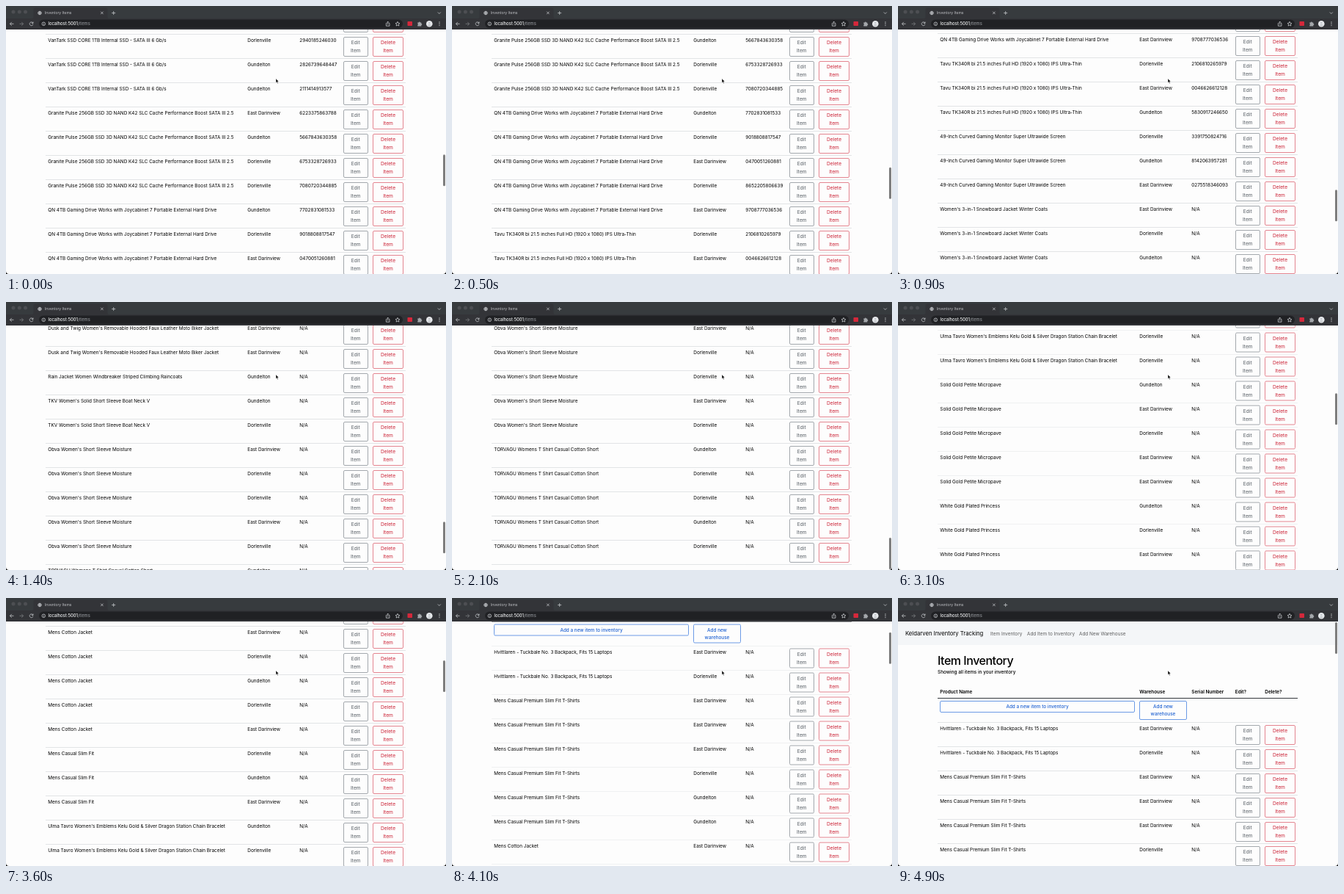
Animation, 600 px wide and 365 px high, one loop 5 s. Source, as an HTML page:

```html
<!DOCTYPE html>
<html lang="en">
<head>
<meta charset="utf-8">
<title>Inventory Items</title>
<style>
  * { box-sizing: border-box; }
  html, body { margin: 0; width: 100%; height: 100%; overflow: hidden; background: #000; }
  .stage { position: relative; width: 600px; height: 365px; overflow: hidden;
    border-radius: 0 0 4px 4px; background: #fdfdfd; color: #000;
    font: 6.4px/10px Inter, "Liberation Sans", sans-serif; }
  .chrome { position: absolute; left: 0; top: 0; width: 600px; height: 32px; }
  .view { position: absolute; left: 0; top: 32px; width: 600px; height: 333px; overflow: hidden; }
  .page { position: absolute; left: 0; top: 0; width: 600px; height: 2521px; }
  .page > * { position: absolute; white-space: nowrap; }
  nav { left: 0; top: 0; width: 600px; height: 32px; background: #f4f6f8; }
  nav span { position: absolute; top: 12px; color: rgba(0, 0, 0, .62); }
  nav .brand { left: 10px; color: #000; font-size: 7.7px; }
  h1 { left: 54px; top: 43px; margin: 0; font-size: 16px; line-height: 20px; font-weight: 500; letter-spacing: -.03em; }
  .lead { left: 54px; top: 64px; font-weight: 500; }
  .table { left: 54px; top: 87px; width: 491px; }
  .row { display: grid; grid-template-columns: 272px 71px 59.5px 40.5px 48px;
    height: 33px; box-shadow: 0 1px #e2e4e6; }
  .row > div { padding: 4.2px 3.3px 0; }
  .head { height: 17px; font-weight: 600; box-shadow: 0 1px #34383c; }
  .btn { margin-top: -.6px; border: 1px solid; border-radius: 2px; text-align: center; white-space: pre; }
  .add { padding: 2.3px 0; color: #1f62d2; border-color: #6c9be6; font-weight: 500; }
  .edit, .del { height: 27px; padding-top: 2.3px; font-size: 6.6px; line-height: 11px; }
  .edit { color: #555c63; border-color: #a3a8ad; }
  .del { color: #cb1f33; border-color: #e48590; }
  .thumb { position: absolute; left: 596px; top: 1px; width: 3px; height: 43px; border-radius: 2px; background: #7d7d7d; }
  .cursor { position: absolute; left: 367px; top: 98px; }
</style>
</head>
<body>
<div class="stage">
  <div class="view">
    <div class="page" id="page">
      <nav>
        <span class="brand">Keldarven Inventory Tracking</span>
        <span style="left:126px">Item Inventory</span>
        <span style="left:176px">Add Item to Inventory</span>
        <span style="left:247px">Add New Warehouse</span>
      </nav>
      <h1>Item Inventory</h1>
      <div class="lead">Showing all items in your inventory</div>
      <div class="table" id="table"></div>
    </div>
    <div class="thumb" id="thumb"></div>
  </div>

  <svg class="chrome" viewBox="0 0 600 32" font-family="Inter, 'Liberation Sans', sans-serif">
    <rect width="600" height="32" fill="#373b3e"/>
    <path d="M0 17H600V32H0Z M35 17q2.500 0 2.500-2.500V5q0-2.500 2.500-2.500h96q2.500 0 2.500 2.500v9.500q0 2.500 2.500 2.500z" fill="#333438"/>
    <rect x="45" y="18.500" width="496" height="11.500" rx="5.750" fill="#202124"/>
    <g fill="#4d4f53">
      <circle cx="10" cy="8" r="2.500"/><circle cx="18.300" cy="8" r="2.500"/><circle cx="26.500" cy="8" r="2.500"/>
    </g>
    <text x="53" y="11.300" font-size="5" fill="#c3c5c9">Inventory Items</text>
    <text x="57.500" y="26.300" font-size="5.800" fill="#a0a4a9"><tspan fill="#f1f3f4" font-weight="500">localhost:5001</tspan>/items</text>
    <g fill="none" stroke="#c4c7cb" stroke-width=".8">
      <circle cx="46" cy="9.500" r="2.300"/><path d="M43.700 9.500h4.600M46 7.200q-2 2.300 0 4.600q2-2.300 0-4.600"/>
      <path d="M129.200 7.700l3.400 3.400m0-3.400l-3.400 3.400M144.200 9.500h5m-2.500-2.500v5M588.800 8.500l2 2l2-2"/>
      <path d="M10.500 24.300H5.500m2.300-2.400l-2.400 2.400l2.400 2.400"/>
      <path d="M18.500 24.300h5m-2.300-2.400l2.400 2.400l-2.400 2.400" stroke="#7c7e82"/>
      <path d="M36.800 23.300a2.400 2.400 0 1 0 .1 1.700M37 21.500v2h-2"/>
      <circle cx="51.300" cy="24.300" r="2.300"/><path d="M51.300 23.800v1.900m0-3.100v.7"/>
      <path d="M519.300 23.500h-.9v3.700h4.600v-3.700h-.9M520.700 25.500v-4.300m-1.400 1.300l1.400-1.400l1.400 1.400"/>
      <path d="M534 21.300l.9 2l2.100.2l-1.600 1.400l.5 2.200l-1.900-1.200l-1.900 1.200l.5-2.200l-1.600-1.400l2.100-.2z"/>
    </g>
    <rect x="547.500" y="21" width="6.500" height="6" rx=".8" fill="#d5283b"/>
    <path d="M561.300 22.500h1.500a1 1 0 0 1 2 0h1.500v1.500a1 1 0 0 1 0 2v1.500h-5v-1.700a.9.900 0 0 0 0-1.700z" fill="#a4a7ab"/>
    <circle cx="577.300" cy="24.300" r="4.300" fill="#e8eaed"/>
    <circle cx="577.300" cy="23" r="1.300" fill="#c3c7cb"/><path d="M574.700 27q.4-2 2.600-2t2.600 2z" fill="#c3c7cb"/>
    <g fill="#c4c7cb"><circle cx="591" cy="22" r=".7"/><circle cx="591" cy="24.300" r=".7"/><circle cx="591" cy="26.600" r=".7"/></g>
  </svg>

  <svg class="cursor" width="7" height="9" viewBox="0 0 7 9">
    <path d="M1 .8V6.600L2.300 5.400L3.200 7.500L4.200 7L3.300 5H5z" fill="#000" stroke="#fff" stroke-width=".5"/>
  </svg>
</div>

<script>
  const LOOP = 5000, STEP = 100, MAX = 2188, TRAVEL = 288;
  const places = { E: "East Darinview", N: "Dorlenville", H: "Gundelton" };

  // name, warehouse of each unit, whether units carry serial numbers
  const products = [
    ["Hvittlaren - Tuckbale No. 3 Backpack, Fits 15 Laptops", "EN"],
    ["Mens Casual Premium Slim Fit T-Shirts", "EEENHH"],
    ["Mens Cotton Jacket", "ENHNE"],
    ["Mens Casual Slim Fit", "NHE"],
    ["Ulma Tavro Women's Emblems Kelu Gold & Silver Dragon Station Chain Bracelet", "HNN"],
    ["Solid Gold Petite Micropave", "HENEE"],
    ["White Gold Plated Princess", "HNE"],
    ["Stainless Steel Double Flared Tunnel Plug Earrings", "NEHN"],
    ["QN 2TB Portable External Hard Drive - USB 3.0", "EN", 1],
    ["VanTark SSD CORE 1TB Internal SSD - SATA III 6 Gb/s", "EHNHH", 1],
    ["Granite Pulse 256GB SSD 3D NAND K42 SLC Cache Performance Boost SATA III 2.5", "EHNN", 1],
    ["QN 4TB Gaming Drive Works with Joycabinet 7 Portable External Hard Drive", "HNENE", 1],
    ["Tavu TK340R bi 21.5 inches Full HD (1920 x 1080) IPS Ultra-Thin", "NEH", 1],
    ["49-Inch Curved Gaming Monitor Super Ultrawide Screen", "NHE", 1],
    ["Women's 3-in-1 Snowboard Jacket Winter Coats", "ENH"],
    ["Dusk and Twig Women's Removable Hooded Faux Leather Moto Biker Jacket", "NEE"],
    ["Rain Jacket Women Windbreaker Striped Climbing Raincoats", "H"],
    ["TKV Women's Solid Short Sleeve Boat Neck V", "HN"],
    ["Obva Women's Short Sleeve Moisture", "ENNEN"],
    ["TORVAGU Womens T Shirt Casual Cotton Short", "HNNHN"]
  ];

  const serials = ("4417290356812 1093847562048 7350162849917 6628401957304 " +
    "2940185246030 2826739648447 2111414913577 6223375863788 5667843630358 " +
    "6753328726933 7080720344885 7702831081533 9018808817547 0470051260881 " +
    "8652205806639 9708777036536 2106810265979 0046626612128 5830917246650 " +
    "3391750824716 8142063957281 0275518346093").split(" ");

  const row = (cells, cls = "") =>
    `<div class="row ${cls}">${cells.map(c => `<div>${c}</div>`).join("")}</div>`;
  const btn = (cls, text) => `<div class="btn ${cls}">${text}</div>`;

  let html = row(["Product Name", "Warehouse", "Serial Number", "Edit?", "Delete?"], "head") +
    row([btn("add", "Add a new item to inventory"), btn("add", "Add new\nwarehouse"), "", "", ""]);
  let next = 0;
  for (const [name, units, tracked] of products)
    for (const u of units)
      html += row([name.replace("&", "&amp;"), places[u], tracked ? serials[next++] : "N/A",
        btn("edit", "Edit\nItem"), btn("del", "Delete\nItem")]);
  document.getElementById("table").innerHTML = html;

  // time in ms, scroll offset in px
  const path = [
    [0, 1286], [200, 1350], [500, 1418], [700, 1450], [800, 1540], [1000, 1760],
    [1200, 1920], [1400, 2023], [1700, 2120], [2000, 2180], [2100, MAX], [2300, 2185],
    [2400, 2110], [2600, 1700], [2800, 1230], [3000, 840], [3100, 692.5], [3300, 520],
    [3600, 395], [3800, 340], [4000, 215], [4100, 104.5], [4200, 8], [4300, 4],
    [4700, 1], [4900, 0], [LOOP, 0]
  ];

  function scrollAt(t) {
    const i = path.findIndex(p => p[0] > t);
    const [t0, a] = path[i - 1], [t1, b] = path[i];
    return a + (b - a) * (t - t0) / (t1 - t0);
  }

  const page = document.getElementById("page"), thumb = document.getElementById("thumb");
  function draw() {
    const t = Math.floor(performance.now() % LOOP / STEP) * STEP;
    const y = scrollAt(t);
    page.style.transform = `translateY(${-y}px)`;
    thumb.style.transform = `translateY(${y / MAX * TRAVEL}px)`;
    requestAnimationFrame(draw);
  }
  draw();
</script>
</body>
</html>
```
